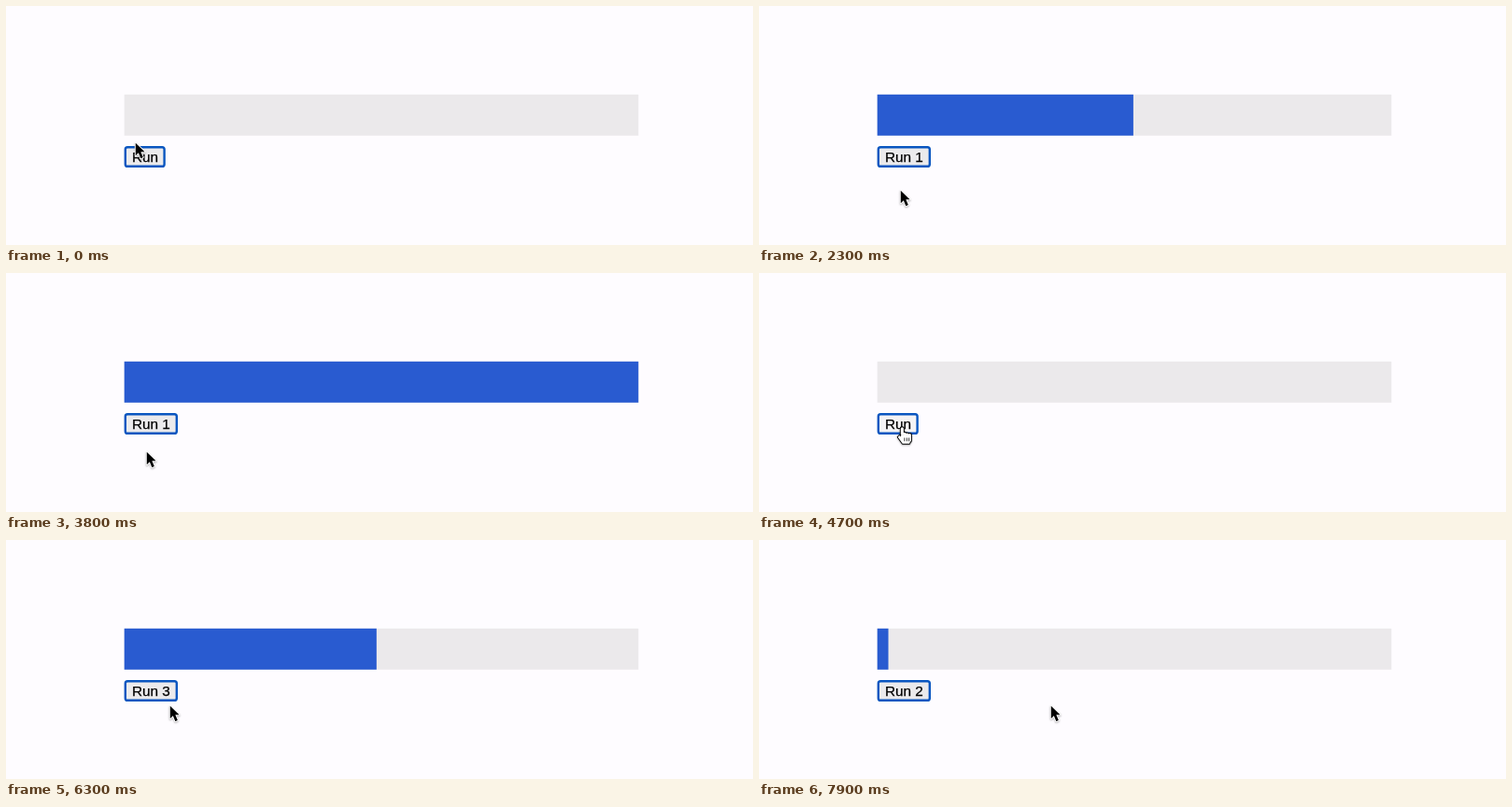
Recreate the animation shown at these times as an HTML page with a canvas. Size 800 by 256 pixels, loop 8 s.

```html
<!DOCTYPE html>
<html lang="en">
<head>
<meta charset="utf-8">
<title>Progress queue</title>
<style>
  html, body { margin: 0; width: 100%; height: 100%; overflow: hidden; background: #fefcff; }
  canvas { display: block; }
</style>
</head>
<body>
<canvas id="stage" width="800" height="256"></canvas>
<script>
const ctx = document.getElementById('stage').getContext('2d');
const LOOP = 8000, STEP = 100;
const RUN = 2980, GAP = 18, PRESS = 150;
const BAR = { x: 126.7, y: 94.8, w: 550.6, h: 44 };
const BUTTON = { x: 126.6, y: 150, h: 23 };

// One click, then a burst of three
const clicks = [816, ...[0, 1, 2].map(i => 4838 + i * 280)];

// A run starts on its click, or as soon as the one before it is done
const starts = [];
for (const click of clicks) {
  const free = starts.length ? starts[starts.length - 1] + RUN + GAP : 0;
  starts.push(Math.max(click, free));
}

// Pointer moves: start, duration, x and y of the end
const moves = [
  [200, 100, 149, 158],
  [1700, 600, 151, 197],
  [2600, 500, 150, 173],
  [3100, 400, 150, 191],
  [4100, 400, 153.5, 166],
  [5600, 700, 175, 177],
  [6500, 700, 312, 177]
];

const clamp01 = v => Math.max(0, Math.min(1, v));
const ease = p => p * p * (3 - 2 * p);

function pointerAt(t) {
  let x = 138, y = 146;
  for (const [start, duration, toX, toY] of moves) {
    const p = ease(clamp01((t - start) / duration));
    const sag = Math.sin(Math.PI * p) * Math.abs(toX - x) * 0.06;
    x += (toX - x) * p;
    y += (toY - y) * p + sag;
    if (p < 1) break;
  }
  return { x, y };
}

function progressAt(t) {
  const start = starts.find(s => t >= s && t < s + RUN + GAP);
  return start === undefined ? 0 : clamp01((t - start) / RUN);
}

function queuedAt(t) {
  const added = clicks.filter(c => c <= t).length;
  const done = starts.filter(s => s + RUN + GAP <= t).length;
  return added - done;
}

function drawBar(progress) {
  ctx.fillStyle = '#ebe9eb';
  ctx.fillRect(BAR.x, BAR.y, BAR.w, BAR.h);
  ctx.fillStyle = '#295bd0';
  ctx.fillRect(BAR.x, BAR.y, BAR.w * progress, BAR.h);
}

function drawButton(label, width, fill) {
  ctx.beginPath();
  ctx.roundRect(BUTTON.x + 1.2, BUTTON.y + 1.2, width - 2.4, BUTTON.h - 2.4, 2.4);
  ctx.fillStyle = fill;
  ctx.fill();
  ctx.strokeStyle = '#0a56c0';
  ctx.lineWidth = 2.4;
  ctx.stroke();
  ctx.fillStyle = ctx.strokeStyle = '#000';
  ctx.lineWidth = 0.25;
  ctx.font = '15.3px "Liberation Sans", Arial, sans-serif';
  ctx.fillText(label, 134.9, 166.7);
  ctx.strokeText(label, 134.9, 166.7);
}

const arrow = new Path2D('M.8 1.6V15.2L4 12.2 6.6 18.2 9.2 17.1 6.6 11.2H11Z');
const hand = new Path2D('M-1.8 9H9.8V13L8 17.8H.2L-5 10.6-3.4 9-1.8 10.4Z');
const creases = new Path2D();
for (let i = 0; i < 4; i++) {
  hand.roundRect(-1.8 + i * 2.8, i ? 5 + i * 0.6 : 0, 3.2, 9, 1.6);
  if (i) creases.rect(i * 2.5 - 0.4, 11.5, 0.8, 3.8);
}

function drawPointer({ x, y }, over) {
  const shape = over ? hand : arrow;
  const [edge, body] = over ? ['#000', '#fff'] : ['#fff', '#000'];
  ctx.save();
  ctx.translate(x, y - 0.7);
  ctx.scale(0.96, 0.98);
  ctx.lineJoin = 'round';
  ctx.shadowColor = 'rgba(0, 0, 0, .3)';
  ctx.shadowBlur = 2;
  ctx.shadowOffsetY = 1;
  ctx.strokeStyle = edge;
  ctx.lineWidth = 2;
  ctx.stroke(shape);
  ctx.shadowColor = 'transparent';
  ctx.fillStyle = body;
  ctx.fill(shape);
  if (over) {
    ctx.fillStyle = edge;
    ctx.fill(creases);
  }
  ctx.restore();
}

function draw(t) {
  const count = queuedAt(t);
  const width = count ? 57.4 : 44.2;
  const pos = pointerAt(t);
  const over = pos.x > BUTTON.x && pos.x < BUTTON.x + width &&
    pos.y > BUTTON.y && pos.y < BUTTON.y + BUTTON.h;
  const down = clicks.some(c => t >= c - PRESS && t < c);

  ctx.fillStyle = '#fefcff';
  ctx.fillRect(0, 0, 800, 256);
  drawBar(progressAt(t));
  drawButton(count ? 'Run ' + count : 'Run', width, down ? '#f4f3f5' : over ? '#dfdee0' : '#ebeaec');
  drawPointer(pos, over);
}

function tick() {
  const t = performance.now() % LOOP;
  draw(Math.floor(t / STEP) * STEP);
  requestAnimationFrame(tick);
}
tick();
</script>
</body>
</html>
```
